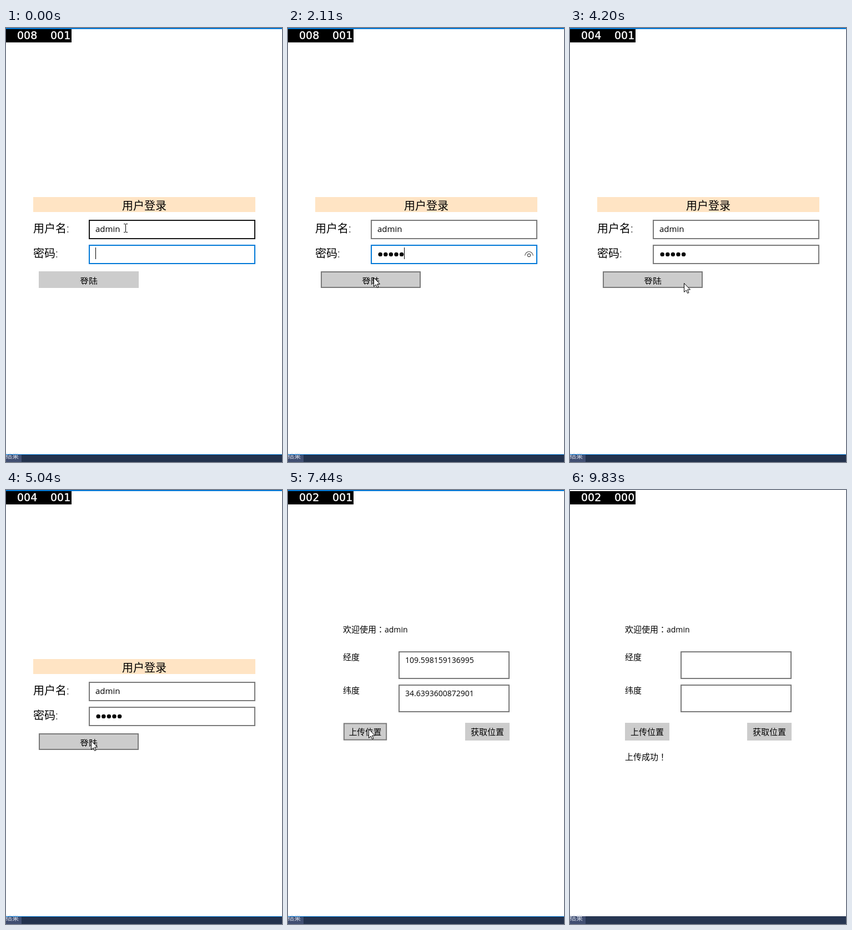
Recreate the animation shown at these times as an HTML page. Size 497 by 783 pixels, loop 9930 ms.

```html
<!DOCTYPE html>
<html lang="zh-CN">
<head>
<meta charset="utf-8">
<title>Login</title>
<style>
html, body { margin: 0; width: 100%; height: 100%; overflow: hidden; background: #fff; }
svg { display: block; width: 497px; height: 783px; }
text { font-family: "Open Sans", "Noto Sans CJK SC", "Noto Sans SC", "Noto Sans CJK", sans-serif; font-size: 15px; white-space: pre; }
.big { font-size: 20px; font-weight: 300; }
.mid { font-size: 16px; }
.latin { font-size: 14px; }
.mark { font-family: "Noto Sans CJK TC", "Noto Sans TC", sans-serif; }
.count { font-family: "DejaVu Sans", sans-serif; font-size: 19px; fill: #fff; stroke: #fff; stroke-width: .4; }
.tab { font-size: 12px; fill: #d3d9e6; }
.field { fill: #fff; stroke: #7a7a7a; stroke-width: 2; }
.button { fill: #ccc; stroke-width: 2; }
.icon { fill: none; stroke: #4a4a4a; stroke-width: 1.1; }
</style>
</head>
<body>
<svg viewBox="0 0 497 783">
  <defs><clipPath id="cut"><rect x="59" y="439" width="180" height="24"/></clipPath></defs>
  <rect width="497" height="783" fill="#fff"/>

  <g id="login">
    <rect x="49" y="305" width="400" height="27" fill="#ffe4c4"/>
    <text class="big" x="209" y="327.5">用户登录</text>
    <text class="big" x="49" y="368.5">用户名:</text>
    <text class="big" x="49" y="413.5">密码:</text>
    <rect id="user" class="field" x="150" y="347" width="298" height="33"/>
    <text x="161" y="368">admin</text>
    <rect id="pass" class="field" x="150" y="392" width="298" height="33"/>
    <g id="dots"></g>
    <g id="eye" class="icon">
      <path d="M426.5 410.5Q428.5 403.5 434 403.5T441.5 410.5"/>
      <circle cx="434" cy="410" r="2.6"/>
    </g>
    <g id="signIn">
      <rect class="button" x="60" y="440" width="178" height="28"/>
      <text class="mid" x="133" y="463" clip-path="url(#cut)">登陆</text>
    </g>
  </g>

  <g id="place">
    <text x="99" y="257">欢迎使用<tspan class="mark" lang="zh-TW">：</tspan></text>
    <text class="latin" x="174" y="257">admin</text>
    <text x="99" y="307">经度</text>
    <text x="99" y="367">纬度</text>
    <rect id="lon" class="field" x="200" y="292" width="198" height="48"/>
    <rect class="field" x="200" y="352" width="198" height="48"/>
    <g id="values">
      <text class="latin" x="211" y="312">109.598159136995</text>
      <text class="latin" x="211" y="372">34.6393600872901</text>
    </g>
    <path id="clear" class="icon" d="M371.5 311.5l9 9m0-9l-9 9"/>
    <g id="upload">
      <rect class="button" x="100" y="421" width="78" height="30"/>
      <text x="109" y="442">上传位置</text>
    </g>
    <rect x="319" y="420" width="80" height="32" fill="#ccc"/>
    <text x="329" y="442">获取位置</text>
    <text id="done" x="99" y="487">上传成功<tspan class="mark" lang="zh-TW">！</tspan></text>
  </g>

  <rect id="caret" width="1"/>
  <rect y="2" width="118" height="24" fill="#000"/>
  <text id="countA" class="count" x="20" y="20"></text>
  <text id="countB" class="count" x="80" y="20"></text>
  <rect id="bar" y="769" width="497" height="14"/>
  <rect y="769" width="28" height="14" fill="#414f72"/>
  <text class="tab" x="-1" y="777">结果</text>
  <path id="edge" d="M0 0h497v2H0zM0 769h497v1H0z" fill="#0078d7"/>

  <path id="beam" d="M212 353.5h3m1 0h3M215.5 354v14M212 368.5h3m1 0h3" fill="none" stroke="#000"/>
  <path id="arrow" d="M.5.5V16.5L4.2 13L6.7 18.5L9 17.5L6.6 12H11.5Z" fill="#fff" stroke="#000"/>
</svg>
<script>
const LOOP = 9930, STEP = 140.43, BLINK = 3.65;
const TYPE = 2, ARROW = 11, SUBMIT = 18, PAGE = 40, UPLOAD = 53, LEAVE = 60, GONE = 65, END = 70;

const $ = id => document.getElementById(id);
const set = (id, attrs) => { for (const k in attrs) $(id).setAttribute(k, attrs[k]); };
const show = (id, on) => { $(id).style.display = on ? '' : 'none'; };
const progress = (k, from, to) => Math.min(1, Math.max(0, (k - from) / (to - from)));
const ease = p => p * p * (3 - 2 * p);
const frame = (id, focus, rest = '#7a7a7a') => { $(id).style.stroke = focus ? '#0078d7' : rest; };

// Each pointer move: start, end, x, y
const moves = [
  [10, 12, 154, 450],
  [29, 31, 255, 470], [31, 34, 150, 450], [35, 36, 153, 452],
  [39, 41, 232, 454], [42, 45, 148, 426], [45, 48, 145, 431],
  [59, LEAVE, 245, 480], [LEAVE, 64, 408, 770]
];

function pointer(k) {
  return moves.reduce(([x, y], [from, to, nx, ny]) => {
    const p = ease(progress(k, from, to));
    return [x + (nx - x) * p, y + (ny - y) * p];
  }, [246, 410]);
}

const NS = 'http://www.w3.org/2000/svg';
for (let i = 0; i < 5; i++) {
  $('dots').append(document.createElementNS(NS, 'circle'));
  const dot = $('dots').lastChild;
  dot.setAttribute('cx', 166.2 + 9.6 * i);
  dot.setAttribute('cy', 408.4);
  dot.setAttribute('r', 3.7);
}

function drawButton(id, [left, top, w, h], press, k, [x, y]) {
  const cx = left + w / 2, cy = top + h / 2;
  const scale = 1 - .03 * Math.sin(Math.PI * progress(k, press - 1, press + 3));
  const over = k >= ARROW && x >= left && x < left + w && y >= top && y < top + h;
  set(id, { transform: `translate(${cx} ${cy}) scale(${scale}) translate(${-cx} ${-cy})` });
  $(id).firstElementChild.setAttribute('stroke', over ? '#7a7a7a' : '#ccc');
}

function draw(k) {
  const second = k >= PAGE, last = k >= END;
  const pos = pointer(k), typed = Math.round(5 * progress(k, TYPE - 1, TYPE + 3));
  show('login', !second);
  show('place', second);
  show('beam', k < TYPE);
  show('arrow', k >= ARROW && k < GONE);
  set('arrow', { transform: `translate(${pos.map(Math.round)})` });

  frame('user', false, k < ARROW ? '#171717' : '#7a7a7a');
  frame('pass', k < SUBMIT);
  [...$('dots').children].forEach((dot, i) => { dot.style.display = i < typed ? '' : 'none'; });
  show('eye', typed > 0 && k < SUBMIT);
  drawButton('signIn', [59, 439, 180, 30], 22, k, pos);

  frame('lon', k < UPLOAD);
  show('clear', k < UPLOAD);
  show('values', k < UPLOAD + 2);
  show('done', k >= UPLOAD + 3);
  drawButton('upload', [99, 420, 80, 32], UPLOAD, k, pos);

  const focused = second ? k < UPLOAD : k < SUBMIT;
  const phase = Math.floor((second ? k - PAGE : k) / BLINK);
  show('caret', focused && phase % 2 === 0);
  set('caret', second
    ? { x: 211, y: 296, height: 20 }
    : { x: Math.round(161 + 9.6 * typed), y: 396, height: 21 });

  $('countA').textContent = k < SUBMIT ? '008' : !second ? '004' : k < UPLOAD ? '020' : '002';
  $('countB').textContent = k < SUBMIT || (k >= 30 && k < LEAVE) ? '001' : '000';
  show('edge', !last);
  set('bar', { fill: last ? '#273652' : '#23324d' });
}

const begin = performance.now();
function tick() {
  const t = (performance.now() - begin) % LOOP;
  draw(Math.floor((t + 20) / STEP));
  requestAnimationFrame(tick);
}
tick();
</script>
</body>
</html>
```
